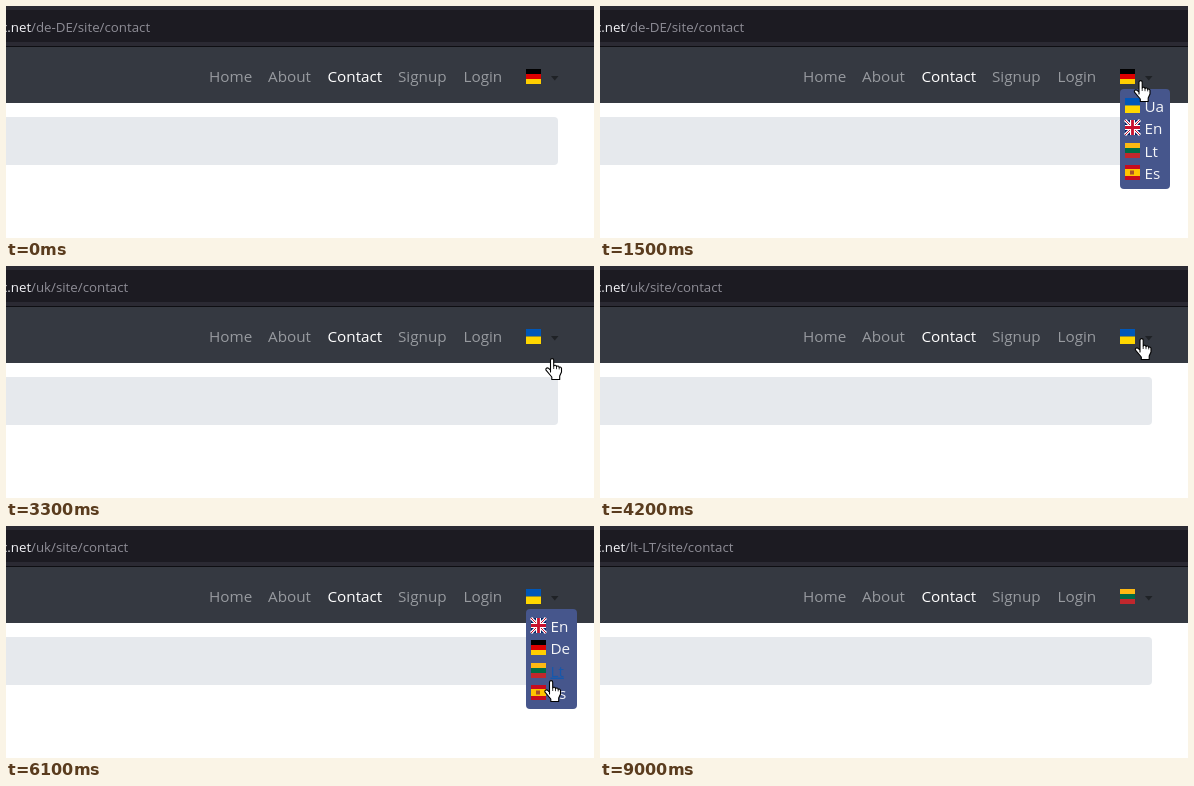
Write an HTML page that moves like this. It is 588x232 px and loops after 9.4 s.

```html
<!DOCTYPE html>
<html lang="en">
<head>
<meta charset="utf-8">
<title>Language menu</title>
<style>
  html, body { margin: 0; width: 100%; height: 100%; overflow: hidden; background: #fff; }
  svg { display: block; width: 588px; height: 232px; font: 15.25px "Open Sans", "Noto Sans", sans-serif; }
  .url { font-size: 13.3px; }
  .hover { fill: #1658ac; text-decoration: underline; }
</style>
</head>
<body>
<svg viewBox="0 0 588 232">
  <rect width="588" height="41" fill="#2b2a33"/>
  <rect y="4" width="588" height="32" fill="#1c1b22"/>
  <rect y="40" width="588" height="1" fill="#0e0e12"/>
  <rect y="41" width="588" height="56" fill="#353941"/>
  <rect x="-8" y="111" width="560" height="48" rx="4" fill="#e6e9ed"/>
  <g class="url">
    <text x="-5.1" y="26" fill="#f4f4f8">c.net</text>
    <text id="path" x="25" y="26" fill="#8e8d96"></text>
  </g>
  <g fill="#979a9f">
    <text x="203" y="76">Home</text>
    <text x="262" y="76">About</text>
    <text x="321.5" y="76" fill="#fff">Contact</text>
    <text x="392" y="76">Signup</text>
    <text x="457.5" y="76">Login</text>
  </g>
  <g id="picker"></g>
  <g id="menu"></g>
  <g id="hand" fill="#fff" stroke="#000" stroke-width="1.1" stroke-linejoin="round">
    <path d="M5.5 14V2.2a1.6 1.6 0 0 1 3.2 0V8a1.5 1.5 0 0 1 2.8.6a1.5 1.5 0 0 1 2.7.8a1.4 1.4 0 0 1 2.3 1V14l-1.8 4v3.5H6.8V19L1 12.2a1.6 1.6 0 0 1 2.4-2l2.1 2z"/>
    <path d="M8.7 8v3M11.5 8.6v2.6M14.2 9.4v2" fill="none" stroke-width=".8"/>
  </g>
</svg>
<script>
const LOOP = 9400, STEP = 100;
const $ = id => document.getElementById(id);

const bands = (...list) => {
  let y = 0;
  return list.map(([color, h]) => {
    const band = `<rect y="${y}" width="15" height="${h}" fill="${color}"/>`;
    y += h;
    return band;
  }).join('');
};
const flags = {
  De: bands(['#000', 5], ['#dd0000', 5], ['#ffce00', 5]),
  Ua: bands(['#0057b8', 7.5], ['#ffd700', 7.5]),
  Lt: bands(['#fdb913', 5], ['#006a44', 5], ['#c1272d', 5]),
  Es: bands(['#c60b1e', 4], ['#ffc400', 7], ['#c60b1e', 4]) +
    '<rect x="5" y="5.5" width="4" height="4" fill="#a8502a"/>',
  En: bands(['#012169', 15]) +
    '<path d="M0 0 15 15M15 0 0 15" stroke="#fff" stroke-width="3"/>' +
    '<path d="M0 0 15 15M15 0 0 15" stroke="#c8102e"/>' +
    '<path d="M7.5 0V15M0 7.5H15" stroke="#fff" stroke-width="5"/>' +
    '<path d="M7.5 0V15M0 7.5H15" stroke="#c8102e" stroke-width="2.8"/>'
};
const flag = (lang, x, y) => `<g transform="translate(${x} ${y})">${flags[lang]}</g>`;

// A page starts at `from`; its flag appears at `ready`; its menu is open from `open` on.
const pages = [
  { from: 0, ready: 0, open: 1500, path: 'de-DE', lang: 'De', items: ['Ua', 'En', 'Lt', 'Es'], width: 50 },
  { from: 3000, ready: 3100, open: 4800, path: 'uk', lang: 'Ua', items: ['En', 'De', 'Lt', 'Es'], width: 51 },
  { from: 6800, ready: 7100, open: Infinity, path: 'lt-LT', lang: 'Lt', items: [] }
];

// Pointer keys: time, x, y
const track = [
  [800, 543, 72], [900, 543, 72], [1000, 539, 67], [1200, 533.5, 74],
  [1700, 533.5, 74], [2000, 537, 106], [2300, 537, 106], [2600, 539, 92],
  [3500, 539, 92], [4200, 534.5, 72], [4800, 534.5, 72], [5200, 535, 128],
  [5700, 538, 154], [6200, 538, 154], [6500, 537.5, 148], [7300, 537.5, 148],
  [7700, 503, 233]
];

function pointer(t) {
  const i = track.findIndex(key => key[0] > t);
  if (i < 1) return null;
  const [t0, x0, y0] = track[i - 1], [t1, x1, y1] = track[i];
  const k = (t - t0) / (t1 - t0);
  return [x0 + (x1 - x0) * k, y0 + (y1 - y0) * k];
}

function menu(page, row) {
  return `<rect x="520" y="83" width="${page.width}" height="100" rx="4" fill="#46568c"/>` +
    page.items.map((lang, i) => {
      const y = Math.round(92 + 22.5 * i - 0.1);
      return flag(lang, 525, y) +
        `<text x="544.5" y="${y + 13.5}" fill="#f4f5f8" class="${i === row ? 'hover' : ''}">${lang}</text>`;
    }).join('');
}

function draw(t) {
  const page = pages.findLast(p => t >= p.from);
  const at = pointer(t);
  const row = at ? Math.floor((at[1] - 87.5) / 22.5) : -1;
  $('path').textContent = `/${page.path}/site/contact`;
  $('picker').innerHTML = t < page.ready ? '' :
    flag(page.lang, 520, 63) + '<path d="M545 70h7.5l-3.75 4.5z" fill="#1f2226"/>';
  $('menu').innerHTML = t < page.open ? '' : menu(page, row);
  $('hand').setAttribute('visibility', at ? 'visible' : 'hidden');
  if (at) $('hand').setAttribute('transform', `translate(${at})`);
}

let last = -1;
function tick() {
  const t = Math.floor(performance.now() % LOOP / STEP) * STEP;
  if (t !== last) draw(last = t);
  requestAnimationFrame(tick);
}
tick();
</script>
</body>
</html>
```
